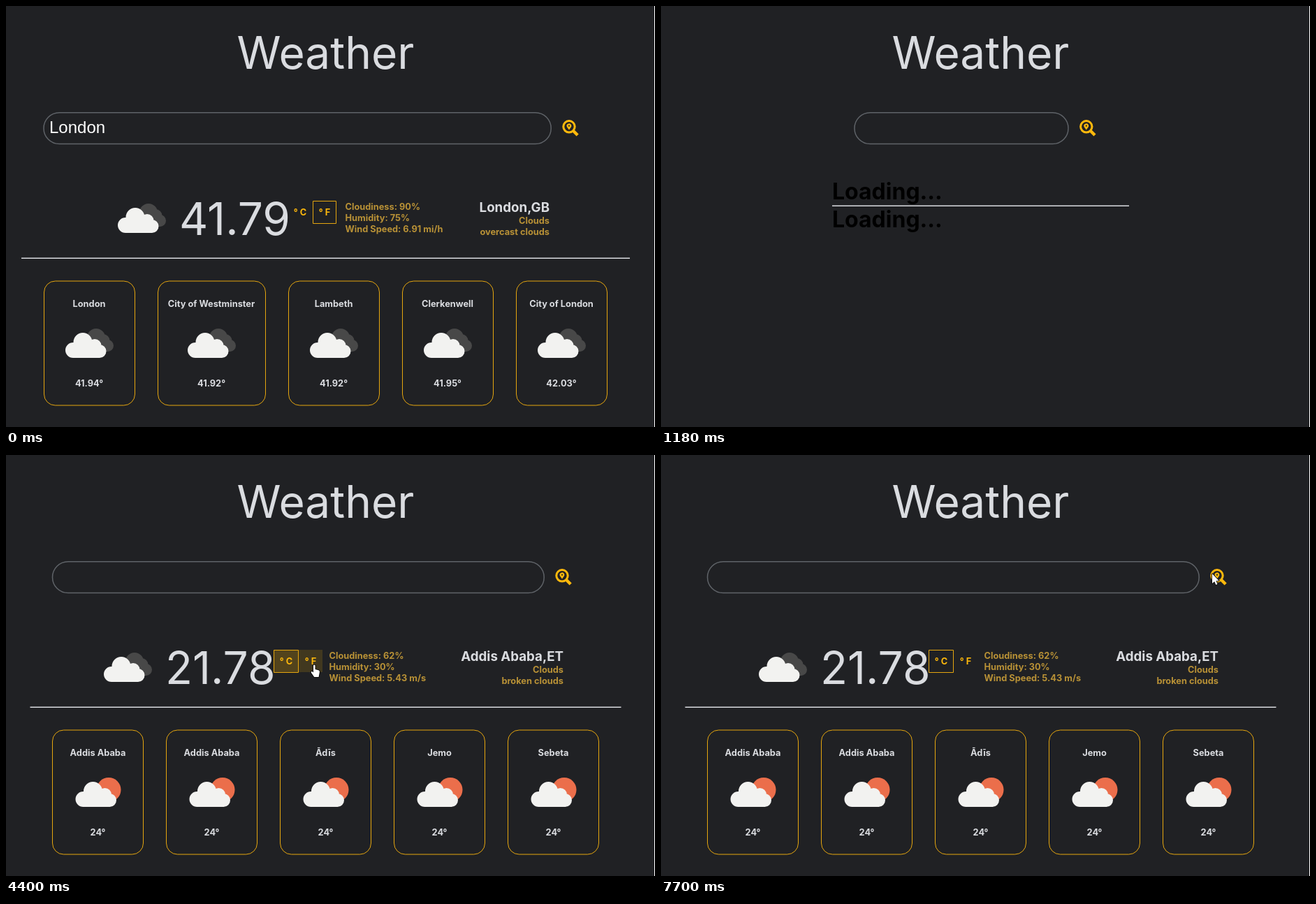
An HTML page with a canvas that plays this animation: 929x603 px, repeating every 8000 ms.

```html
<!DOCTYPE html>
<html lang="en">
<head>
<meta charset="utf-8">
<title>Weather</title>
<style>
html, body { margin: 0; width: 100%; height: 100%; overflow: hidden; background: #202124; }
canvas { display: block; }
</style>
</head>
<body>
<canvas id="stage" width="929" height="603"></canvas>
<script>
const ctx = document.getElementById('stage').getContext('2d');
const LOOP = 8000, MID = 457.5;
const BG = '#202124', LIGHT = '#dadce0', GOLD = '#ffb90c', DIM = '#b89136', BORDER = '#e5a60f';

const london = {
  width: 871, icon: 144, temp: '41.79', unit: 'F', query: 'London',
  details: ['Cloudiness: 90%', 'Humidity: 75%', 'Wind Speed: 6.91 mi/h'], detailsX: 485.5,
  place: 'London,GB', sky: 'overcast clouds', placeX: 778, sunny: false,
  cards: [['London', '41.94°'], ['City of Westminster', '41.92°', 155], ['Lambeth', '41.92°'],
    ['Clerkenwell', '41.95°'], ['City of London', '42.03°']]
};
const addis = {
  width: 846, icon: 124, temp: '21.78', unit: 'C', query: '',
  details: ['Cloudiness: 62%', 'Humidity: 30%', 'Wind Speed: 5.43 m/s'], detailsX: 462.5,
  place: 'Addis Ababa,ET', sky: 'broken clouds', placeX: 798, sunny: true,
  cards: ['Addis Ababa', 'Addis Ababa', 'Ādīs', 'Jemo', 'Sebeta'].map(name => [name, '24°'])
};

// Pointer stops: time, x, y, shape
const pointer = [
  [3320, 36, 235, 'arrow'], [3440, 53, 258, 'arrow'], [3590, 120, 285, 'arrow'], [3710, 190, 279, 'arrow'],
  [3830, 235, 265, 'beam'], [3980, 367, 265, 'beam'], [4130, 398, 288, 'hand'], [4250, 410, 302, 'hand'],
  [4400, 436, 300, 'hand'], [4550, 500, 276, 'arrow'], [4670, 600, 238, 'arrow'], [4790, 671, 204, 'arrow'],
  [4940, 745, 172, 'beam'], [5060, 786, 170, 'arrow'], [5210, 789, 172, 'hand'], [5330, 786, 173, 'hand'],
  [5480, 648, 172, 'beam'], [5630, 500, 174, 'beam'], [5750, 410, 176, 'beam'], [5870, 369, 178, 'beam'],
  [6020, 373, 180, 'beam'], [6170, 368, 179, 'beam'], [6450, 261, 213, 'arrow'], [6600, 268, 300, 'arrow'],
  [6720, 287, 388, 'arrow'], [6870, 620, 330, 'arrow'], [6990, 885, 240, 'arrow'], [7110, 789, 170, 'arrow']
];
const shapes = {
  arrow: new Path2D('M0 0V14L3.2 11.2L5.3 16L7.6 15L5.5 10.3H9.8Z'),
  hand: new Path2D('M4 1.2Q5.3 -.3 6.6 1.2V7L11.5 8.2Q13.2 8.8 12.9 11L11.6 18H5.2L.8 11.8Q.3 9.6 2.2 10L4 11.5Z')
};

// Linear interpolation through [time, value] points
function ramp(t, points) {
  if (t <= points[0][0]) return points[0][1];
  for (let i = 1; i < points.length; i++) {
    const [t0, a] = points[i - 1], [t1, b] = points[i];
    if (t < t1) return a + (b - a) * (t - t0) / (t1 - t0);
  }
  return points[points.length - 1][1];
}

function text(str, x, y, size, color, align = 'left', weight = 700, family = 'Inter, sans-serif') {
  ctx.font = `${weight} ${size}px ${family}`;
  ctx.textAlign = align;
  ctx.fillStyle = color;
  ctx.fillText(str, x, y);
}

function rect(x, y, w, h, color) {
  ctx.fillStyle = color;
  ctx.fillRect(x, y, w, h);
}

function outline(x, y, w, h, r, color, line) {
  ctx.strokeStyle = color;
  ctx.lineWidth = line;
  ctx.beginPath();
  ctx.roundRect(x, y, w, h, r);
  ctx.stroke();
}

function blob(color, circles, base) {
  ctx.fillStyle = color;
  ctx.beginPath();
  for (const [x, y, r] of circles) {
    ctx.moveTo(x + r, y);
    ctx.arc(x, y, r, 0, 7);
  }
  if (base) ctx.rect(...base);
  ctx.fill();
}

function weatherIcon(x, y, sunny) {
  ctx.save();
  ctx.translate(x, y);
  if (sunny) {
    blob('#eb6e4b', [[65.5, 46.5, 17.5]]);
    ctx.translate(2, 0);
  } else {
    blob('#484848', [[60, 42, 13], [70, 46.5, 9.5], [76.5, 53.5, 8.5]], [58, 50, 18, 12]);
  }
  blob('#f2f2f0', [[27, 60, 11], [41, 48.5, 13.5], [58, 53.5, 9.5], [65, 61.5, 9.5]], [27, 54, 38, 17]);
  ctx.restore();
}

function searchIcon(cx, hover) {
  if (hover > 0) blob(`rgba(255,185,0,${hover})`, [[cx, 175, 27.7]]);
  const color = hover > 0.3 ? '#f7dc95' : GOLD;
  ctx.save();
  ctx.translate(cx - 12, 163);
  ctx.strokeStyle = color;
  ctx.lineWidth = 3;
  ctx.beginPath();
  ctx.arc(9.8, 9.8, 8.2, 0, 7);
  ctx.stroke();
  ctx.lineWidth = 4.4;
  ctx.beginPath();
  ctx.moveTo(15.5, 15.5);
  ctx.lineTo(22, 22);
  ctx.stroke();
  ctx.fillStyle = color;
  ctx.beginPath();
  ctx.arc(9.8, 8.7, 3.4, 2.7, 6.7);
  ctx.lineTo(9.8, 14.4);
  ctx.moveTo(10.9, 8.7);
  ctx.arc(9.8, 8.7, 1.1, 0, 7);
  ctx.fill('evenodd');
  ctx.restore();
}

function header(width, query, hover) {
  const inner = width - 63, left = MID - inner / 2;
  const inputWidth = Math.min(inner * 0.9, inner - 55);
  text('Weather', MID, 90, 64, LIGHT, 'center', 400);
  outline(left + 0.5, 152.75, inputWidth - 1, 44.8, 22.4, '#5f6368', 1.5);
  text(query, left + 8.5, 182, 24, '#fff', 'left', 400, '"Liberation Sans", Arial, sans-serif');
  searchIcon(left + inputWidth + 27.5, hover);
}

function divider(width, y) {
  rect(MID - width / 2, y - 0.5, width, 1.5, LIGHT);
}

function unitButton(name, x, w, active, hover) {
  if (hover > 0) rect(x, 279, w, 32, `rgba(255,185,0,${hover})`);
  if (active) outline(x + 0.5, 279.5, w - 1, 32, 0, BORDER, 1);
  text('° ' + name, x + w / 2, 300, 12.8, GOLD, 'center');
}

function current(city, hoverC, hoverF) {
  const unitX = city.icon + 259;
  text(city.temp, city.icon + 104, 328, 64, LIGHT, 'left', 400);
  unitButton('C', unitX, 36, city.unit === 'C', hoverC);
  unitButton('F', unitX + 36, 34, city.unit === 'F', hoverF);
  city.details.forEach((line, i) => text(line, city.detailsX, 292 + 16 * i, 12.8, DIM));
  text(city.place, city.placeX, 294.5, 18.72, LIGHT, 'right');
  text('Clouds', city.placeX, 312, 12.8, DIM, 'right');
  text(city.sky, city.placeX, 327.5, 12.8, DIM, 'right');
}

function cards(city) {
  let x = MID - city.width / 2 + 31.5;
  for (const [name, temp, w = 131] of city.cards) {
    const mid = x + w / 2;
    outline(Math.round(x) + 0.5, 394, w - 1, 178, 16, BORDER, 1);
    text(name, mid, 430.5, 12.8, LIGHT, 'center');
    weatherIcon(mid - 50, 433, city.sunny);
    text(temp, mid, 544.5, 12.8, LIGHT, 'center');
    x += w + 32;
  }
}

function loading(width, baseline) {
  text('Loading...', MID - width / 2, baseline, 32, '#000');
}

function fullPage(city, hover = 0, hoverC = 0, hoverF = 0) {
  header(city.width, city.query, hover);
  weatherIcon(city.icon, 254, false);
  current(city, hoverC, hoverF);
  divider(city.width, 361);
  cards(city);
}

function loadingPage(t) {
  const width = t < 1460 ? 425 : t < 1610 ? 584 : 682;
  header(width, '', 0);
  if (t < 1460) {
    loading(width, 277);
    divider(width, 286);
    loading(width, 317);
    return;
  }
  const hasIcon = t >= 1610, lineY = hasIcon ? 361 : 348;
  ctx.save();
  if (hasIcon) weatherIcon(addis.icon, 254, false);
  else ctx.translate(-50, -6);
  current(addis, 0, 0);
  ctx.restore();
  divider(width, lineY);
  loading(width, lineY + 31);
}

function drawPointer([, x, y, shape]) {
  ctx.save();
  ctx.translate(x, y);
  if (shape === 'beam') {
    rect(2.5, 0, 1, 14, '#fff');
    rect(0.5, 0, 5, 1, '#fff');
    rect(0.5, 13, 5, 1, '#fff');
  } else {
    ctx.lineWidth = 1.6;
    ctx.lineJoin = 'round';
    ctx.strokeStyle = '#000';
    ctx.fillStyle = '#fff';
    ctx.stroke(shapes[shape]);
    ctx.fill(shapes[shape]);
  }
  ctx.restore();
}

function draw(t) {
  const blank = t >= 1030 && t < 1180;
  rect(0, 0, 929, 603, blank ? '#fff' : BG);
  rect(928, 0, 1, 603, blank ? '#a8a8a8' : '#fff');
  if (blank) return;
  if (t < 1030) {
    fullPage(london);
    if (t >= 500) rect(142, 161, 1.5, 26, '#fff');
  } else if (t < 1760) {
    loadingPage(t);
  } else {
    const stop = pointer.filter(p => p[0] <= t).pop();
    const step = stop ? stop[0] : 0;
    fullPage(addis,
      ramp(step, [[5060, 0], [5210, 0.58], [5330, 0.65], [5480, 0.5], [5870, 0]]),
      ramp(step, [[3980, 0], [4250, 0.35], [4670, 0]]),
      ramp(step, [[4250, 0], [4550, 0.3], [5210, 0]]));
    if (t >= 6020 && t < 6600 || t >= 7110 && t < 7700) rect(75, 162, 1.5, 26, '#fff');
    if (stop) drawPointer(stop);
  }
}

function frame() {
  draw(performance.now() % LOOP);
  requestAnimationFrame(frame);
}
frame();
</script>
</body>
</html>
```
